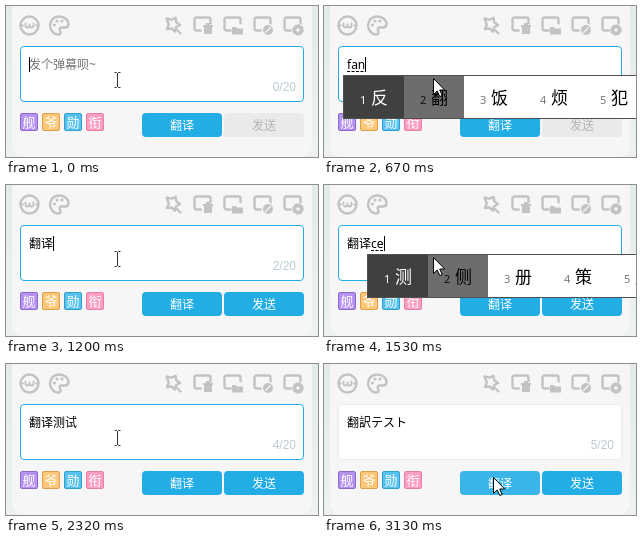
An HTML page that plays this animation: 312x151 px, repeating every 4.12 s.

```html
<!DOCTYPE html>
<html lang="zh-CN">
<head>
<meta charset="utf-8">
<style>
  html, body { margin: 0; height: 100%; overflow: hidden; background: #f6f6f6; }
  svg { display: block; width: 100%; height: 100%; }
  text { font: 500 12px "Noto Sans", "Noto Sans CJK SC", sans-serif; white-space: pre; }
  .mid { text-anchor: middle; }
  #input { font-weight: 400; }
  #icons { fill: none; stroke: #c3c3c3; stroke-width: 2.4; stroke-linecap: round; stroke-linejoin: round; }
  #icons .solid { fill: #c3c3c3; stroke: none; }
  #icons .cut { fill: #f6f6f6; stroke: none; }
  #icons .thin { stroke: #f6f6f6; stroke-width: 1.3; }
  #count { font: 12px "Liberation Sans", Arial, sans-serif; fill: #bccad4; text-anchor: end; }
  #popup .num { font-size: 11px; }
  #popup .word { font-size: 17px; }
</style>
</head>
<body>
<svg viewBox="0 0 312 151">
  <defs>
    <linearGradient id="page" x2="0" y2="1">
      <stop stop-color="#e2ebea"/><stop offset="1" stop-color="#edf1f1"/>
    </linearGradient>
  </defs>
  <rect width="312" height="151" fill="url(#page)"/>
  <rect x="6" y="-20" width="300" height="171" rx="12" fill="#f6f6f6"/>

  <g id="icons">
    <circle cx="23.5" cy="19.5" r="9"/>
    <path d="M19.500 17.500v2a2 2 0 0 0 4 0v-1v1a2 2 0 0 0 4 0v-2M14.500 19.500h2.500M30 19.500h2.500" stroke-width="1.800"/>
    <path d="M53.500 10.500c-6 0-9.500 4-9.500 9s4 9 8 9c3 0 3-2 2-4s0-3 2-3h3c2 0 3.500-1 3.500-3.500 0-4-4-7.500-9-7.500z"/>
    <g class="solid">
      <circle cx="48.500" cy="19" r="1.600"/><circle cx="51" cy="15" r="1.600"/><circle cx="56" cy="15" r="1.600"/>
    </g>
    <path d="M160.500 12.500l5 1.200 4-2 .800 4.500 3.700 2.800-4 2.200-1 4.300-3.500-3-4.500.500 1.800-4.500z"/>
    <path d="M170.500 23.500l4 4"/>
  </g>

  <rect id="box" x="14.5" y="40.5" width="283" height="55" rx="3.500" fill="#fff"/>
  <text id="input" x="23" y="63"></text>
  <path id="underline" stroke="#000" stroke-dasharray="3 1.500"/>
  <rect id="caret" y="51" width="1" height="15"/>
  <text id="count" x="290" y="85"></text>
  <g id="badges"></g>

  <rect id="translate" x="136" y="107" width="80" height="24" rx="4"/>
  <text id="translateLabel" class="mid" x="176" y="123.500" fill="#fff"></text>
  <rect id="send" x="218" y="107" width="80" height="24" rx="4"/>
  <text id="sendLabel" class="mid" x="258" y="123.500">发送</text>

  <g id="popup"></g>
  <path id="beam" d="M108.500 66.500h2l1 1 1-1h2M111.500 67v14M108.500 81.500h2l1-1 1 1h2" fill="none" stroke="#333"/>
  <path id="arrow" d="M.5.5v16l3.700-3.500 2.600 5.500 2.400-1-2.500-5.500h5z" fill="#fff" stroke="#000"/>
</svg>
<script>
const LOOP = 4120;
const BLUE = '#23ade5';
const $ = id => document.getElementById(id);
const set = (id, attrs) => {
  for (const key in attrs) $(id).setAttribute(key, attrs[key]);
};
const show = (id, on) => { $(id).style.display = on ? '' : 'none'; };

// Toolbar buttons: a window outline with a small symbol in its lower right corner.
const symbols = [
  '<path class="solid" d="M10 9h10v2h-1v7h-8v-7h-1zM13 7h4v2h-4z"/>',
  '<path class="solid" d="M9 11h4l1 1.500h6v6h-11z"/>',
  '<circle class="solid" cx="15" cy="14" r="5"/><path class="thin" d="M12.500 16.500l5-5"/>',
  '<circle class="solid" cx="15" cy="14" r="4.500"/><circle cx="15" cy="14" r="4.500" stroke-dasharray="1.500 2"/><circle class="cut" cx="15" cy="14" r="1.700"/>'
];
$('icons').innerHTML += symbols.map((symbol, i) =>
  `<g transform="translate(${187 + i * 30} 10)">
    <rect x="1.500" y="1.500" width="16" height="13" rx="2"/>
    <circle class="cut" cx="15" cy="14" r="6.500"/>${symbol}</g>`).join('');

const badges = [
  ['舰', '#b591f2', '#8f68cc'], ['爷', '#fcc778', '#dda04a'],
  ['勋', '#57c2ee', '#2f9fd0'], ['衔', '#fb9cc0', '#e77fa8']
];
$('badges').innerHTML = badges.map(([label, fill, edge], i) => {
  const x = 14 + i * 22;
  return `<rect x="${x + .5}" y="107.500" width="17" height="17" rx="1.500" fill="${fill}" stroke="${edge}"/>
    <text class="mid" x="${x + 9}" y="120.500" fill="#fff" style="font-size:13px">${label}</text>`;
}).join('');

// [start, committed text, typed letters, candidates]
const typing = [
  [0, '', '', ''],
  [330, '', 'f', '发 分 放 法 非'],
  [530, '', 'fa', '发 法 罚 乏 伐'],
  [600, '', 'fan', '发 法 罚 乏 伐'],
  [670, '', 'fan', '反 翻 饭 烦 犯'],
  [1000, '', "fan'y", '翻译 反应 反映 翻页'],
  [1070, '', "fan'yi", '翻译 反义 翻一 犯疑'],
  [1200, '翻译', '', ''],
  [1330, '翻译', 'c', '从 才 次 此 错'],
  [1530, '翻译', 'ce', '测 侧 册 策 厕'],
  [1660, '翻译', "ce'sh", '测试 侧身 测算 侧式'],
  [1730, '翻译', "ce'shi", '测试 侧式 侧室 侧视'],
  [1860, '翻译测试', '', ''],
  [3130, '翻訳テスト', '', '']
];

function popupMarkup(left, words, mouseX) {
  const pitch = 43 + 17 * words[0].length;
  const items = words.map((word, i) => {
    const x = left + 1 + i * pitch;
    const hovered = mouseX >= x && mouseX < x + pitch;
    const fill = i === 0 ? '#404040' : hovered ? '#6d6d6d' : '#fff';
    const numberColor = i === 0 ? '#fff' : hovered ? '#111' : '#777';
    return `<rect x="${x}" y="70" width="${pitch}" height="42" fill="${fill}"/>
      <text class="num" x="${x + 16}" y="97.500" fill="${numberColor}">${i + 1}</text>
      <text class="word" x="${x + 27}" y="98" fill="${i ? '#000' : '#fff'}">${word}</text>`;
  });
  return `<rect x="${left}" y="69" width="400" height="44" fill="#505050"/>
    <rect x="${left + 1}" y="70" width="398" height="42" fill="#fff"/>` + items.join('');
}

function pointerAt(t) {
  const step = Math.min(5, Math.floor((t - 2580) / 67) + 1);
  const p = 1 - (1 - step / 5) ** 2;
  return [Math.round(111 + 58 * p), Math.round(74 + 39 * p)];
}

function render(t) {
  const [, text, letters, candidates] = typing.filter(state => state[0] <= t).pop();
  const composing = letters !== '';
  const moving = t >= 2580;
  const [x, y] = moving ? pointerAt(t) : [109, 72];
  const empty = !text && !composing;

  $('input').textContent = empty ? '发个弹幕呗~' : text + letters;
  set('input', { fill: empty ? '#757575' : '#000' });
  const end = empty ? 23 : Math.round(23 + $('input').getComputedTextLength());
  set('caret', { x: end });
  show('caret', t < 2320);
  const start = 23 + text.length * 12;
  set('underline', { d: `M${start} 65.500H${end}` });
  show('underline', composing);

  $('popup').innerHTML = composing ? popupMarkup(start - 4, candidates.split(' '), x) : '';
  $('count').textContent = text.length + '/20';
  set('box', { stroke: t < 2990 ? BLUE : '#e9eaec' });

  const hovered = moving && x >= 136 && y >= 107;
  set('translate', { fill: hovered ? '#39b5e7' : BLUE });
  $('translateLabel').textContent = t >= 3060 && t < 3130 ? '翻译中' : '翻译';
  set('send', { fill: text ? BLUE : '#e9eaec' });
  set('sendLabel', { fill: text ? '#fff' : '#b4b4b4' });

  const overText = !composing && y < 96;
  show('beam', overText);
  show('arrow', !overText);
  set('beam', { transform: moving ? `translate(${x - 111} ${y - 74})` : '' });
  set('arrow', { transform: `translate(${x} ${y})` });
}

const origin = performance.now();
function tick() {
  render((performance.now() - origin) % LOOP);
  requestAnimationFrame(tick);
}
tick();
</script>
</body>
</html>
```
